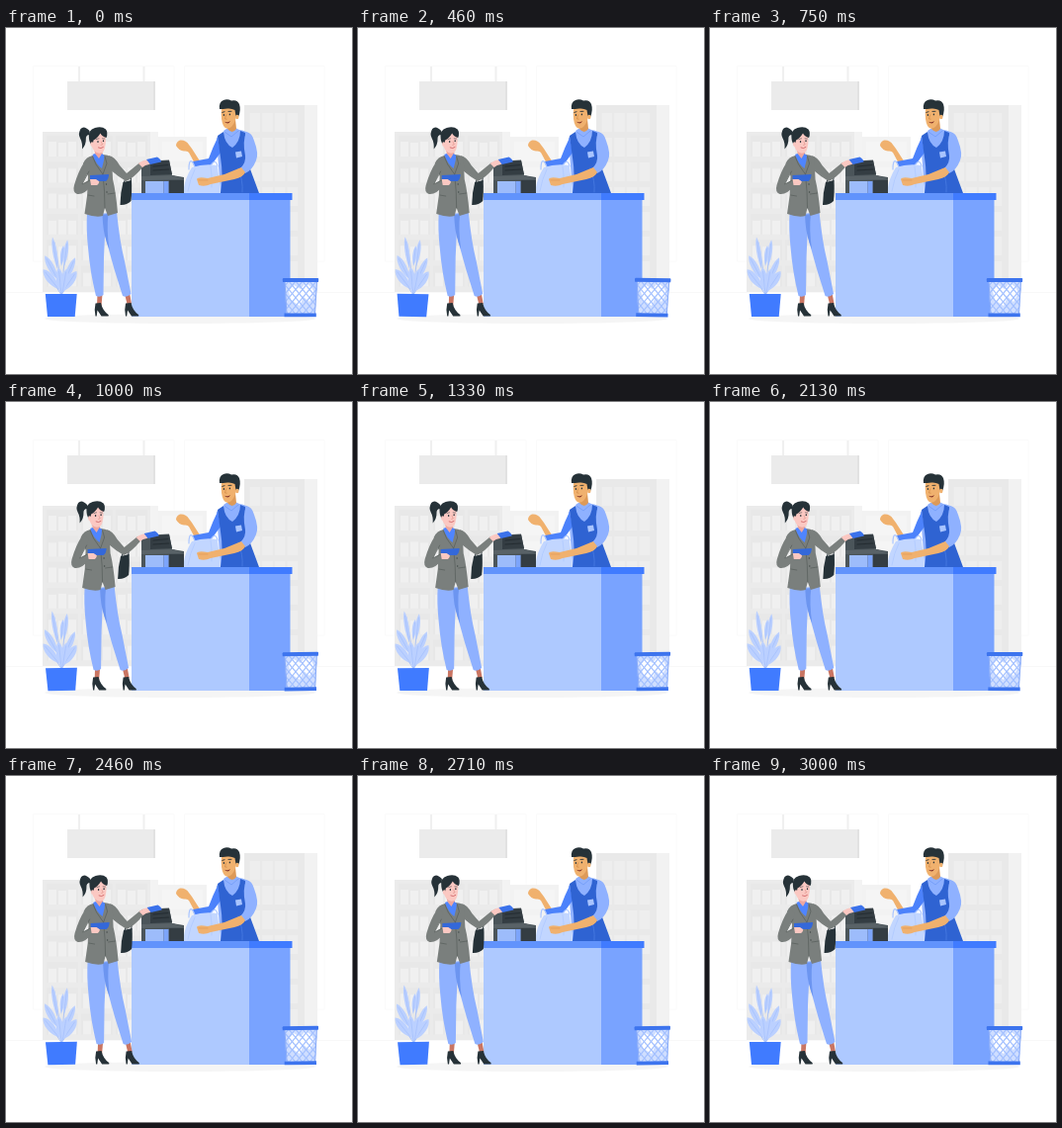
These frames come from a looping animation (350 by 350 pixels, 3.04 s). An HTML page with a canvas:

```html
<!DOCTYPE html>
<html lang="en">
<head>
<meta charset="utf-8">
<title>At the checkout</title>
<style>
html, body { margin: 0; width: 100%; height: 100%; overflow: hidden; background: #fff; }
canvas { display: block; width: 350px; height: 350px; }
</style>
</head>
<body>
<canvas id="stage"></canvas>
<script>
const LOOP = 3040, SIZE = 350;
const BLUE = '#407bff', DARK = '#263238', SKIN = '#fbc8c2', TAN = '#f0b16e';
const JACKET = '#7a7f7d', FOLD = '#565d5b', SHIRT = '#8fb1ff';
const canvas = document.getElementById('stage');
const ctx = canvas.getContext('2d');
const dpr = window.devicePixelRatio || 1;
canvas.width = canvas.height = SIZE * dpr;

function rect(x, y, w, h, color) {
  ctx.fillStyle = color;
  ctx.fillRect(x, y, w, h);
}
function shape(d, color) {
  ctx.fillStyle = color;
  ctx.fill(new Path2D(d));
}
function line(d, color, width = 1) {
  ctx.strokeStyle = color;
  ctx.lineWidth = width;
  ctx.lineCap = ctx.lineJoin = 'round';
  ctx.stroke(new Path2D(d));
}
function oval(x, y, rx, ry, color) {
  ctx.fillStyle = color;
  ctx.beginPath();
  ctx.ellipse(x, y, rx, ry, 0, 0, Math.PI * 2);
  ctx.fill();
}

function room() {
  line('M28 38.5 H170 V236 H28Z M181 38.5 H322 V236 H181Z', '#fafafa');
  rect(0, 267, 350, .7, '#f5f5f5');

  rect(73, 39, 2, 15, '#f0f0f0');
  rect(138.5, 39, 2, 15, '#f0f0f0');
  rect(62, 54, 89, 29, '#ebebeb');
  rect(149, 54, 2, 29, '#e2e2e2');

  // left shelves
  rect(37, 105, 117, 162, '#ebebeb');
  rect(146, 105, 8, 162, '#f3f3f3');
  for (let row = 0; row < 6; row++) {
    const y = 109 + row * 26.3;
    for (const x of [41, 76, 111]) {
      rect(x, y, 32, 21, '#e8e8e8');
      for (let i = 0; i < 3; i++) rect(x + 2 + i * 10, y + 6 + (i + row) % 2, 8, 15 - (i + row) % 2, '#f0f0f0');
    }
  }

  rect(154, 110, 49, 157, '#f2f2f2');
  rect(158, 115, 41, 20, '#f5f5f5');
  rect(158, 141, 41, 20, '#f5f5f5');

  // right shelves
  rect(241, 78, 61, 189, '#e9e9e9');
  rect(302, 78, 13, 189, '#f2f2f2');
  for (let row = 0; row < 7; row++) {
    for (let i = 0; i < 4; i++) rect(246.5 + i * 12.7, 86 + row * 25, 10.5, 19, '#eeeeee');
  }
  oval(176, 294, 137, 5, '#f5f5f5');
}

function cashier() {
  // torso and far arm
  shape('M213 111 Q219 105 224 104 L236 103 Q244 104 248 109 L245 167 H217Z', SHIRT);
  shape('M192 139 L185 126 Q184 124 180 124.5 Q175 124 172 119 Q172 115 176 113.5 Q182 113 185 118 L188 122 L197 136Z', TAN);
  shape('M214 111 Q209 121 205 132 L189 135 Q190 143 198 143.5 Q205 143 209 137 L217 126Z', '#4c82fb');
  shape('M214 109 L220 105 Q221 117 229 121 Q237 115 237 104 L242 106 L246 140 L256 167 H217 Q220 149 217 131Z', '#2f63d2');
  shape('M220 104 L229 120 L236 103 L232 101 L223 102Z', SHIRT);
  line('M221 105 L228 110 L235 104', '#6e98f5', .7);
  shape('M232 125.5 L238 124.5 L239 130 L233 131.5Z', '#a8c4ff');
  line('M235 142 Q240 155 239 166', '#4a7be2', .8);

  // carrier bag
  line('M185 143 Q185 133 188 135 Q191 138 192 146', '#aac5ff', 1.2);
  line('M207 139 Q212 131 214 140', '#aac5ff', 1.2);
  shape('M188 141 Q200 137 214 139 L217 167 H179 Q181 151 188 141Z', '#c2d6ff');
  line('M191 143 Q186 153 184 165 M207 140 Q209 152 208 161', '#afc9ff', .8);

  // near arm
  shape('M243 105 Q249 106 251 114 Q256 127 253 134 Q249 144 242 147 L237 142 Q243 136 242 129 Q239 115 243 105Z', SHIRT);
  shape('M238 141 L242 146 Q240 151 231 153 L207 158 Q201 161 195 159 L193 153 Q194 150 204 152 L221 148Z', TAN);
  line('M195 154 L204 154', '#d99455', .6);

  // head
  shape('M223 94 L232 92 L233 102 Q229 108 224 102Z', '#dd9a58');
  shape('M218 81 Q217 93 220 99 Q223 104 228 100 Q233 95 234 82 Q230 77 219 79Z', TAN);
  shape('M216 82 Q215 75 220 73 Q224 71.5 228 73.5 Q234 72 236 77 Q238 83 235 90 L232.5 89 L231.5 83 Q228 81 224 81.5 Q219 82 216 82Z', DARK);
  oval(233.8, 90, 1.7, 2.3, TAN);
  oval(220.4, 88, .7, .9, DARK);
  oval(226.4, 87.4, .7, .9, DARK);
  line('M218.8 85.4 L221 84.7 M225 84.4 L228 84.3', DARK, .9);
  line('M222.5 88 L221.5 92 L223.2 92.2', '#cc8340', .6);
  shape('M220.8 94.8 Q224 96 227 94 Q225 98.6 220.8 94.8Z', '#8a3a2c');
}

function counter() {
  rect(127, 173, 119, 119, '#aec9ff');
  rect(246, 173, 41.5, 119, '#79a3ff');
  rect(127, 167, 119, 7, '#6193fc');
  rect(246, 167, 43.5, 7, BLUE);
}

function register() {
  shape('M137 135 L165 133.5 L168 149 L180 151 V167 H137Z', '#4b555a');
  shape('M146 136 L165 134 L168 148 L146 149Z', '#343d43');
  line('M149 140 L164 138.5 M149 144 L165 143', '#252d32', 1.2);
  shape('M137 150 L169 149 L180 153 L137 154Z', '#596267');
  rect(165, 154, 15, 13, '#343d43');
  rect(141, 155, 18.5, 12, '#9dbcfb');
  rect(159.5, 155, 5, 12, '#7da5fb');
}

function leaf(x, y, len, wide, turn) {
  ctx.save();
  ctx.translate(x, y);
  ctx.rotate(turn * Math.PI / 180);
  shape(`M0 0 C${-wide} ${-len * .3} ${-wide} ${-len * .8} 0 ${-len} C${wide} ${-len * .8} ${wide} ${-len * .3} 0 0Z`, '#bbd0ff');
  line(`M0 0 V${-len * .85}`, '#94b4fb', .4);
  ctx.restore();
}

function plant() {
  line('M56 270 Q54 240 49 217 M56 270 Q58 240 62 218 M56 270 Q48 258 42 247 M56 270 Q64 258 70 248', '#94b4fb', .7);
  leaf(52, 243, 32, 3, -9);
  leaf(56, 240, 20, 2.8, 6);
  leaf(59, 240, 26, 3, 7);
  leaf(52, 254, 27, 4.5, -28);
  leaf(53, 264, 25, 5.5, -38);
  leaf(59, 257, 27, 4, 24);
  leaf(58, 266, 24, 5.5, 34);
  leaf(56, 269, 27, 5, -6);
  leaf(57, 268, 25, 4.5, 10);
  shape('M39.8 269 H71.7 L69.7 292 H42Z', BLUE);
}

function basket() {
  const body = new Path2D('M282 256 H315 L312.5 290 H283.5Z');
  ctx.save();
  ctx.clip(body);
  rect(280, 253, 38, 39, '#cfdeff');
  shape('M286 266 L291 260 L298 264 L303 258 L309 262 L312 268 L307 277 L301 272 L297 281 L288 275Z', '#fff');
  for (let x = 244; x < 350; x += 7) {
    line(`M${x} 256 l30 36 M${x} 256 l-30 36`, '#a3c0ff', 1.2);
  }
  ctx.restore();
  line('M282 256 L284 290 M314.5 256 L312.5 290', '#86a9f8', 1);
  shape('M280.5 253 H315.5 Q316.5 253 316.2 255 L316 257 H280 L279.7 254Z', '#3d74ee');
  rect(281.5, 288.5, 32.3, 3.7, '#3d74ee');
}

function shoe(x, y) {
  shape(`M${x} ${y} L${x + 5.5} ${y - .5} Q${x + 7} ${y + 7} ${x + 13} ${y + 11.5} Q${x + 14} ${y + 13} ${x + 12} ${y + 13} H${x + 6} L${x + 2} ${y + 7} L${x + 1.2} ${y + 13} H${x} Q${x - 1.5} ${y + 6} ${x} ${y}Z`, DARK);
}

function woman() {
  // legs
  shape('M92.5 269 H97.5 L96.5 281 H92Z', '#c97562');
  shape('M120 269 L125 268 L127 279 H122.5Z', '#c97562');
  shoe(90.5, 278.5);
  shoe(121, 278.5);
  shape('M96 188 L112 186 Q115 216 120 236 L126.5 269 Q122 273 118 271 Q109 244 102 217Z', SHIRT);
  shape('M82 187 L101 188 Q100 210 99 232 L98.5 270 Q95 273 91 271 Q85 247 83 222 Q81 203 82 187Z', SHIRT);
  shape('M97.5 189 L103.5 188 Q101.5 203 104.5 224 Q99 211 98 197Z', '#6c95f0');

  // handbag
  line('M119 157 Q122 148 128 146 Q126 151 126 156', DARK, 1);
  shape('M118.5 156 L127 154 Q127.5 166 126.5 175 Q122 179.5 115.5 179 Q115.5 167 118.5 156Z', DARK);

  // reaching arm
  shape('M104 129 Q110 130 115 139 L122 147 L135.5 136 L138.5 140.5 Q129 152 121.5 155 Q113 150 105 143Z', JACKET);
  shape('M134 137 Q139 133 146 133 L149 135 Q146 138 141 139 L138 141Z', SKIN);
  shape('M142 133 L153 130.5 Q157 133 157 135.5 L146 138Z', '#3b72eb');

  // neck, jacket, shirt collar
  shape('M88 129 Q81 130 78 137 L83 150 Q83 169 79.5 188 Q91 192 98 190 L100 182 L103 190 L113 187 Q111 165 108 153 L107 131 Q103 128 98 128Z', JACKET);
  shape('M89 121 L97 121 L98 131 L91 133Z', '#eea79f');
  shape('M87.5 128 L90 127 L94 132 L97 127 L99.5 129 L99 134 L97 142 Q91 138 87.5 128Z', '#4f85ff');
  line('M87.5 130 L91 138 L98 148 Q100 165 100 182 M100 130 L102 137 L98 148', FOLD, .7);
  line('M103 168 L110 167 M83 169 L89 170', FOLD, .7);
  oval(101.5, 158, .7, .7, '#404947');
  oval(102, 166, .7, .7, '#404947');

  // bent arm and cup
  shape('M79 136 Q84 134 86 140 L77 158 L86 153 L87 159 Q79 169 72 168 Q67 166 69 159 Q73 145 79 136Z', JACKET);
  line('M84 145 L77 158 L85 154', FOLD, .7);
  shape('M85 153 Q89 150 94 153 Q95 157 92 159 L86 159Z', SKIN);
  shape('M85 149 L104 148 Q104 153 101 155 H94 L91 153 L85 153Z', '#3468d9');

  // head
  shape('M84.5 104 Q79 98 75.5 102 Q72.5 107 75 111.5 Q77.5 116 77 122.5 Q81 118 80.8 113 Q80.5 108 84.5 108Z', DARK);
  shape('M86 108 Q85 119 89 124 Q94 129 98.5 125 Q102 119 100.5 106Z', SKIN);
  shape('M84 112 Q82.5 103 90 101 Q97 99 101 102.5 Q103.5 106 101.5 111 Q97 109.5 95.5 106.5 Q92 112 88.5 113.5 L87.5 119 Q84.5 117 84 112Z', DARK);
  oval(87, 117.5, 1.6, 2.2, SKIN);
  oval(93, 115, .7, .9, DARK);
  oval(98.5, 114.2, .7, .9, DARK);
  line('M91.3 112.6 L94 111.8 M97.5 111.8 L99.8 112', DARK, .5);
  line('M96.3 115 L97.6 118 L96 118.4', '#dd8f86', .6);
  line('M93.5 121 Q96 122.6 98.4 120.5', '#c34d51', .7);
}

// swings one degree each way, linear, every 1.5 s
function windAngle(t) {
  const p = (t % 1500) / 1500;
  const wave = p < .25 ? p * 4 : p < .75 ? 2 - p * 4 : p * 4 - 4;
  return wave * Math.PI / 180;
}
function swing(angle, x, y, draw) {
  ctx.save();
  ctx.translate(x, y);
  ctx.rotate(angle);
  ctx.translate(-x, -y);
  draw();
  ctx.restore();
}

const steps = [[0, 0], [460, -.3], [1000, -2.4], [1710, 0], [2130, -1.2], [2460, .6], [LOOP, 0]];
function sway(t) {
  let i = 1;
  while (i < steps.length - 1 && t > steps[i][0]) i++;
  const [t0, a] = steps[i - 1], [t1, b] = steps[i];
  const p = (t - t0) / (t1 - t0);
  return a + (b - a) * (1 - Math.cos(Math.PI * p)) / 2;
}

function draw(t) {
  ctx.setTransform(dpr, 0, 0, dpr, 0, 0);
  rect(0, 0, SIZE, SIZE, '#fff');
  room();
  cashier();
  register();
  counter();
  const angle = windAngle(t);
  swing(angle, 56, 251.5, plant);
  swing(angle, 298, 272.5, basket);
  ctx.save();
  ctx.translate(sway(t), 0);
  woman();
  ctx.restore();
}

let start = null;
function tick(now) {
  if (start === null) start = now;
  draw((now - start) % LOOP);
  requestAnimationFrame(tick);
}
draw(0);
requestAnimationFrame(tick);
</script>
</body>
</html>
```
